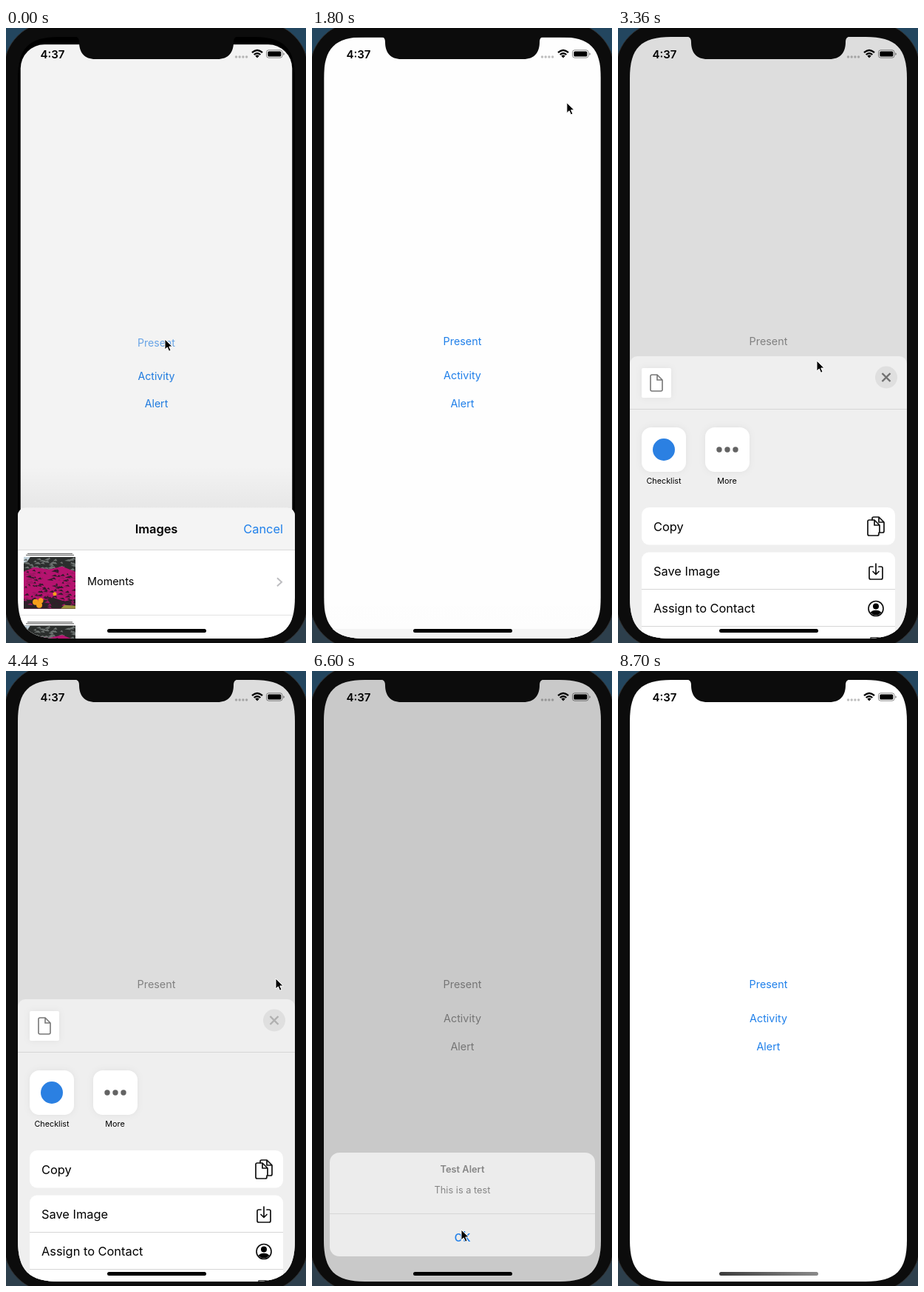
Recreate the animation shown at these times as an HTML page. Size 406 by 830 pixels, loop 8.94 s.

```html
<!DOCTYPE html>
<html lang="en">
<head>
<meta charset="utf-8">
<style>
html, body { margin: 0; width: 100%; height: 100%; overflow: hidden; background: #23465f; }
svg { display: block; width: 406px; height: 830px; font: 14.4px Inter, "Liberation Sans", sans-serif; }
.mid { text-anchor: middle; }
.big { font-size: 16.4px; }
.bold { font-weight: 600; }
.blue { fill: #2080ea; }
.gray { fill: #858585; }
.rule { stroke: #d6d6d6; }
.tile { fill: #fff; filter: drop-shadow(0 0 5px rgba(0, 0, 0, .06)); }
.icon { fill: none; stroke: #111; stroke-width: 1.7; stroke-linecap: round; stroke-linejoin: round; }
</style>
</head>
<body>
<svg viewBox="0 0 406 830">
  <defs>
    <clipPath id="glass">
      <path d="M16 68C16 27 31 12 72 12H335C376 12 391 27 391 68V768C391 809 376 824 335 824H72C31 824 16 809 16 768Z"/>
    </clipPath>
    <clipPath id="square"><rect width="70" height="70"/></clipPath>
    <linearGradient id="fade" x2="0" y2="1">
      <stop stop-opacity="0"/><stop offset="1" stop-opacity=".05"/>
    </linearGradient>
    <linearGradient id="worn">
      <stop stop-color="#3c3c3c"/><stop offset="1" stop-color="#8a8a8a"/>
    </linearGradient>
    <g id="thumb">
      <path d="M5 -4.5H66M3 -2.5H68" stroke="#555"/>
      <g clip-path="url(#square)">
        <rect width="70" height="70" fill="#2b2e2d"/>
        <path d="M0 0H9L5 6 0 9Z" fill="#c3d3dc"/>
        <path id="twigs" fill="#6d7371"/>
        <path d="M0 20L14 14 34 17 52 13 70 20V70H0Z" fill="#b5136f"/>
        <path d="M0 70V56L20 60 40 55 55 60 70 57V70Z" fill="#2a2426"/>
        <path id="petals" fill="#9d1562"/>
        <path id="leaves" fill="#331a2b"/>
        <path d="M50 70L55 65 70 66V70Z" fill="#98913c"/>
        <g fill="#f6a01c"><circle cx="16" cy="61" r="4"/><circle cx="23" cy="59" r="3.5"/><circle cx="21" cy="65" r="4"/><circle cx="42" cy="50" r="2.5"/></g>
      </g>
    </g>
    <path id="chevron" d="M-3 -5.5L3 0L-3 5.5" fill="none" stroke="#bdbdc0" stroke-width="2"/>
  </defs>

  <rect y="790" width="406" height="40" fill="#2d3f4c"/>
  <rect x="-3" y="-8" width="412" height="846" rx="64" fill="#0c0c0c" stroke="#303030"/>

  <g clip-path="url(#glass)">
    <rect width="406" height="830"/>
    <g id="app">
      <rect id="page" x="16" y="12" width="375" height="830" fill="#fff"/>
      <g class="mid">
        <text id="present" x="203.5" y="428">Present</text>
        <text id="activity" x="203.5" y="474">Activity</text>
        <text id="alert" x="203.5" y="512">Alert</text>
      </g>
      <rect id="dim" x="16" y="12" width="375" height="830"/>
    </g>

    <g id="picker">
      <rect x="16" y="-56" width="375" height="56" fill="url(#fade)" id="shade"/>
      <rect x="16" width="375" height="800" rx="10" fill="#fff"/>
      <path d="M16 56V10a10 10 0 0 1 10-10H381a10 10 0 0 1 10 10V56Z" fill="#f4f4f4"/>
      <path class="rule" d="M16 56.5H391"/>
      <path d="M16 144.5H391" stroke="#e2e2e2"/>
      <text class="mid big bold" x="203.5" y="34">Images</text>
      <text id="cancel" class="big blue" x="375" y="34" text-anchor="end">Cancel</text>
      <use href="#thumb" x="24" y="66"/><use href="#thumb" x="24" y="158.5"/><use href="#thumb" x="24" y="247.5"/>
      <text x="110" y="104">Moments</text>
      <text x="110" y="189">All Images</text><text class="gray" x="110" y="209">6</text>
      <text x="110" y="278">Recents</text><text class="gray" x="110" y="298">6</text>
      <use href="#chevron" x="370" y="100"/><use href="#chevron" x="370" y="193"/><use href="#chevron" x="370" y="282"/>
      <text class="big bold" x="24" y="357">My Albums</text>
    </g>

    <g id="share">
      <rect x="16" width="375" height="500" rx="10" fill="#efefef"/>
      <rect class="tile" x="32" y="16" width="40" height="40" rx="2"/>
      <path d="M46 25H53L60 32V45a2 2 0 0 1-2 2H46a2 2 0 0 1-2-2V27a2 2 0 0 1 2-2ZM53 25V32H60" fill="none" stroke="#777" stroke-width="1.6"/>
      <circle cx="363" cy="28.5" r="15" fill="#dfdfdf"/>
      <path id="cross" d="M357.5 23L368.5 34M368.5 23L357.5 34" stroke-width="2.4"/>
      <path class="rule" d="M16 71.5H391"/>
      <rect class="tile" x="32" y="96" width="60" height="60" rx="13"/>
      <rect class="tile" x="118" y="96" width="60" height="60" rx="13"/>
      <g fill="#fff">
        <rect x="32" y="204" width="343" height="50.5" rx="10"/>
        <rect x="32" y="264.5" width="343" height="200" rx="10"/>
      </g>
      <circle cx="62" cy="126" r="15" fill="#2b80e2"/>
      <g fill="#636363"><circle cx="137" cy="126" r="3.7"/><circle cx="148" cy="126" r="3.7"/><circle cx="159" cy="126" r="3.7"/></g>
      <g class="mid" font-size="10.8"><text x="62" y="171.5">Checklist</text><text x="147.5" y="171.5">More</text></g>
      <g class="big">
        <text x="48" y="236">Copy</text><text x="48" y="296">Save Image</text><text x="48" y="346">Assign to Contact</text>
      </g>
      <path class="rule" d="M32 314.5H375M32 364.5H375"/>
      <g class="icon">
        <path d="M344 221H340a2 2 0 0 0-2 2V240a2 2 0 0 0 2 2H351a2 2 0 0 0 2-2V238"/>
        <path d="M346 217H353L360 224V236a2 2 0 0 1-2 2H355M344 221V219a2 2 0 0 1 2-2M353 217V224H360M344 221H347L354 228V238M347 221V228H354"/>
        <path d="M345 284H342a2 2 0 0 0-2 2V299a2 2 0 0 0 2 2H356a2 2 0 0 0 2-2V286a2 2 0 0 0-2-2H353M349 280V294M345 290.5L349 294.5L353 290.5"/>
        <circle cx="349" cy="340.5" r="10"/>
        <path d="M342 384V380H356V384"/>
      </g>
      <circle cx="349" cy="337.5" r="4"/><path d="M341.5 346C344 341.5 354 341.5 356.5 346Q349 353 341.5 346Z"/>
    </g>

    <g id="sheet" class="mid">
      <rect x="24" width="359" height="140" rx="13" fill="#ececec"/>
      <path class="rule" d="M24 82.5H383"/>
      <g font-size="12.8" class="gray">
        <text class="bold" x="203.5" y="27">Test Alert</text>
        <text x="203.5" y="55">This is a test</text>
      </g>
      <text id="ok" class="blue" font-size="19.3" x="203.5" y="120">ok</text>
    </g>

    <path d="M92 11C97 12 99 14 99 19C99 33 106 42 121 42H286C301 42 308 33 308 19C308 14 310 12 315 11Z" fill="#0c0c0c"/>
    <rect id="bar" x="137" y="811" width="134" height="5" rx="2.5"/>
    <g id="status">
      <text class="bold" font-size="15" x="46.5" y="40.5">4:37</text>
      <g opacity=".25"><circle cx="311.5" cy="39" r="1.7"/><circle cx="316.2" cy="39" r="1.7"/><circle cx="320.9" cy="39" r="1.7"/><circle cx="325.6" cy="39" r="1.7"/></g>
      <path d="M333 33.2Q340 26.8 347 33.2M335.7 36Q340 32.2 344.3 36" fill="none" stroke="currentColor" stroke-width="2.3"/>
      <path d="M337.3 37.6Q340 35.4 342.7 37.6L340 40.4Z"/>
      <rect x="352.5" y="29.8" width="21.5" height="10.4" rx="3" fill="none" stroke="currentColor" opacity=".45"/>
      <rect x="354.3" y="31.5" width="18" height="7" rx="1.5"/>
      <path d="M375.3 33.2V36.8Q376.8 36.4 376.8 35T375.3 33.2Z" opacity=".5"/>
    </g>
  </g>
  <path id="cursor" d="M0 0V14L3.3 11L5.6 16.3L8.1 15.2L5.8 10H10.2Z" stroke="#fff" stroke-width="1"/>
</svg>
<script>
const LOOP = 8940, STEP = 60;
const el = id => document.getElementById(id);
const set = (id, name, value) => el(id).setAttribute(name, value);
const mix = (a, b, k) => a + (b - a) * k;

// time, x, y of the pointer
const path = [
  [0, 215, 420], [780, 215, 420], [1440, 348, 92], [1740, 348, 92], [2400, 212, 468],
  [3120, 212, 468], [3600, 326, 430], [3900, 361, 459], [4140, 365, 409], [4200, 365, 415],
  [4560, 365, 415], [5160, 219, 504], [5700, 219, 504], [6300, 202, 754], [6660, 202, 754],
  [7140, 214, 419], [8040, 214, 419]
];
const exit = [[8400, 200, 756], [8700, 50, 832]];

function follow(points, t) {
  const i = points.findIndex(p => p[0] > t);
  if (i < 1) return null;
  const [a, b] = [points[i - 1], points[i]];
  const k = (t - a[0]) / (b[0] - a[0]), ease = k * k * (3 - 2 * k);
  return [mix(a[1], b[1], ease), mix(a[2], b[2], ease)];
}

function spring(t) {
  const x = Math.max(0, t) * 0.025;
  return 1 - (1 + x) * Math.exp(-x);
}

let seed = 7;
const rnd = () => (seed = seed * 16807 % 2147483647) / 2147483647;

// small random flecks between two heights
function scatter(id, count, top, bottom) {
  let d = "";
  while (count--) {
    const w = 2 + rnd() * 4;
    d += `M${rnd() * 72 - 3} ${mix(top, bottom, rnd())}l${w} ${-1 - rnd() * 2}l${w / 2} 3z`;
  }
  set(id, "d", d);
}

function draw(t) {
  const open = (from, to) => spring(t - from) - spring(t - to);
  const during = (from, to) => t >= from && t < to;
  const pick = open(-36.6, 1560), share = open(2552, 4440), alert = open(5352, 6640);

  // the page shrinks behind the picker
  const s = 1 - pick * 32 / 375;
  set("app", "transform", `translate(${203.5 * (1 - s)} ${12 + 44 * pick - 12 * s}) scale(${s})`);
  const r = pick > 0.001 ? mix(40, 10, pick) : 0;
  set("page", "rx", r);
  set("dim", "rx", r);
  set("dim", "opacity", pick * 0.196 + share * 0.133 + alert * 0.21);

  const g = Math.max(share, alert);
  const tint = `rgb(${[[32, 148], [128, 148], [234, 148]].map(c => mix(...c, g))})`;
  const press = { present: during(0, 120), activity: during(2460, 2760), alert: during(5280, 5520) };
  for (const id in press) {
    set(id, "fill", tint);
    set(id, "opacity", press[id] ? 0.65 : 1);
  }
  set("cancel", "opacity", during(1500, 1620) ? 0.35 : 1);
  set("cross", "stroke", during(3900, 5340) ? "#b0b0b0" : "#707070");
  set("shade", "opacity", pick < 0.95 ? Math.min(1, pick * 5) : 0);

  const slide = (id, height, k) => {
    set(id, "transform", `translate(0 ${824 - height * k})`);
    set(id, "visibility", k > 0.002 ? "visible" : "hidden");
  };
  slide("picker", 756, pick);
  slide("share", 381, share);
  slide("sheet", 174, alert);

  const ink = pick > 0.5 ? "#fff" : "#000";
  set("status", "fill", ink);
  set("status", "color", ink);
  set("bar", "fill", t >= 8640 ? "url(#worn)" : "#000");

  const at = follow(path, t) || follow(exit, t);
  set("cursor", "visibility", at ? "visible" : "hidden");
  if (at) set("cursor", "transform", `translate(${at})`);
}

function tick() {
  draw(Math.floor(performance.now() % LOOP / STEP) * STEP);
  requestAnimationFrame(tick);
}
scatter("twigs", 50, 3, 20);
scatter("petals", 60, 20, 68);
scatter("leaves", 90, 18, 66);
tick();
</script>
</body>
</html>
```
